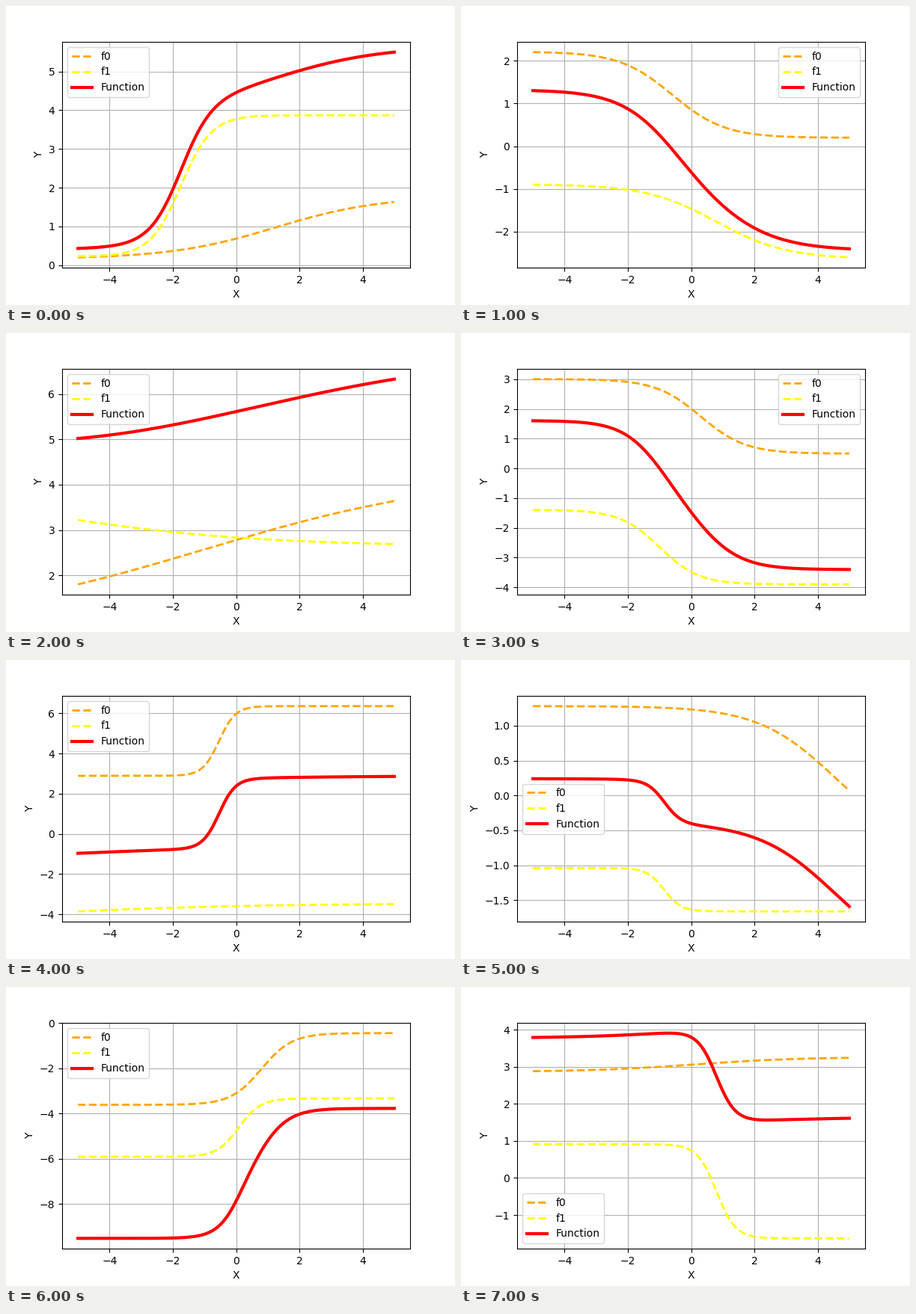
A matplotlib script for the animation above (8 s loop, 600 by 400 pixels).

```python
import numpy as np
import matplotlib.pyplot as plt
from matplotlib.animation import FuncAnimation

x = np.linspace(-5, 5, 200)


def ease(start, end, steepness, centre):
    """Sigmoid path from start at the left end to end at the right end."""
    s = 1 / (1 + np.exp(-steepness * (x - centre)))
    return start + (end - start) * (s - s[0]) / (s[-1] - s[0])


def settle(start, end):
    """Path that flattens out towards its end."""
    return ease(start, end, 0.28, -7)


SCENES = [
    (ease(0.2, 1.63, 0.6, 1.25), ease(0.23, 3.87, 2.05, -1.75)),
    (ease(2.2, 0.2, 1.2, -0.6), ease(-0.9, -2.6, 0.9, 0.8)),
    (ease(1.8, 3.64, 0.24, -1), settle(3.22, 2.69)),
    (ease(3, 0.5, 1.4, 0.3), ease(-1.4, -3.9, 1.6, -1)),
    (ease(2.89, 6.36, 3.85, -0.54), settle(-3.86, -3.5)),
    (ease(1.28, 0.07, 0.82, 4.55), ease(-1.04, -1.66, 3.7, -0.85)),
    (ease(-3.61, -0.44, 2.06, 0.8), ease(-5.91, -3.33, 2.9, 0.08)),
    (ease(2.88, 3.24, 0.6, 0.1), ease(0.91, -1.63, 3.3, 0.8)),
]

fig, ax = plt.subplots(figsize=(6, 4), dpi=100)
fig.subplots_adjust(left=0.125, right=0.9, bottom=0.125, top=0.88)


def draw(i):
    y0, y1 = SCENES[i]
    ax.clear()
    ax.plot(x, y0, "--", color="orange", lw=2, label="f0")
    ax.plot(x, y1, "--", color="yellow", lw=2, label="f1")
    ax.plot(x, y0 + y1, color="red", lw=3, label="Function")
    ax.set_xlabel("X")
    ax.set_ylabel("Y")
    ax.grid(True)
    ax.legend(loc="best")
    return ax.lines


anim = FuncAnimation(fig, draw, frames=len(SCENES), init_func=lambda: [],
                     interval=1000, repeat=True, repeat_delay=0)
plt.show()
```
